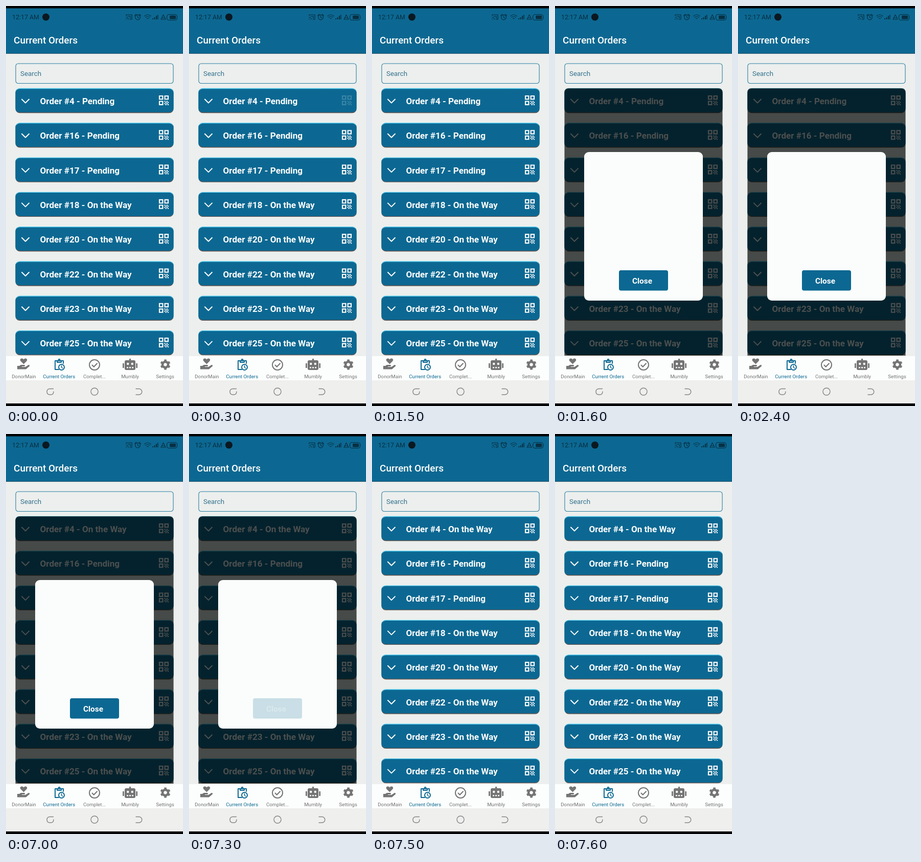
These frames come from a looping animation (346x778 px, 8000 ms). An HTML page:

```html
<!DOCTYPE html>
<html lang="en">
<head>
<meta charset="utf-8">
<title>Current Orders</title>
<style>
  html, body { margin: 0; width: 100%; height: 100%; overflow: hidden; background: #000; }
  svg { display: block; font-family: Roboto, sans-serif; }
  .line { fill: none; stroke-linecap: round; stroke-linejoin: round; }
  .order { font-size: 17.1px; font-weight: 700; fill: #fff; }
  .tab { font-size: 9.7px; text-anchor: middle; }
</style>
</head>
<body>
<svg width="346" height="778" viewBox="0 0 346 778">
  <defs>
    <linearGradient id="edge" x2="0" y2="1">
      <stop offset="0" stop-color="#55cdf2"/>
      <stop offset=".12" stop-color="#0c6892"/>
      <stop offset=".88" stop-color="#0c6892"/>
      <stop offset="1" stop-color="#66544f"/>
    </linearGradient>
    <path id="codeIcon" fill="#fff" fill-rule="evenodd" d="M3 3h8v8H3zM5 5v4h4V5zM3 13h8v8H3zM5 15v4h4v-4zM13 3h8v8h-8zM15 5v4h4V5zM13 13h2v2h-2zM15 15h2v2h-2zM13 17h2v2h-2zM17 13h2v2h-2zM19 15h2v2h-2zM17 17h2v2h-2zM15 19h2v2h-2zM19 19h2v2h-2z"/>
  </defs>

  <rect y="5" width="346" height="768" fill="#ecefed"/>
  <rect y="4.500" width="346" height="88.500" fill="#0c6892"/>
  <rect y="92" width="346" height="1" fill="#34566a"/>

  <!-- status bar -->
  <g fill="#082f42">
    <text x="12" y="26" font-size="12.4">12:17 AM</text>
    <circle cx="78" cy="21.5" r="7" fill="#0b1820"/>
    <path d="M286 26h2v-2h-2zM289.5 26h2v-4h-2zM293 26h2v-7h-2zM296 26h1.500v-9h-1.500z"/>
    <rect x="320" y="18.500" width="12" height="7" rx="1.500"/>
  </g>
  <g class="line" stroke="#082f42" stroke-width="1.200">
    <path d="M235 19v-2h11v9h-4M235 22a4 4 0 0 1 4 4M235 25v1M238 20h5v4"/>
    <circle cx="257.500" cy="22" r="4.800"/>
    <path d="M257.500 19v3l2 1.500M251.500 19l3-3M263.500 19l-3-3M271 19.500q6-5 12 0M273 22q4-3 8 0M275.500 24.500q1.500-1 3 0M303 26l4.500-9 4.500 9zM304.500 23h6"/>
    <rect x="314.500" y="16.500" width="20" height="11" rx="4"/>
  </g>

  <text x="15" y="73" font-size="19" font-weight="500" fill="#fff">Current Orders</text>
  <rect x="19" y="112" width="308" height="38.500" rx="5" fill="none" stroke="#2b7ea3" stroke-width="1.100"/>
  <text x="28" y="136" font-size="13.400" fill="#34718e">Search</text>

  <g id="cards"></g>

  <g id="modal">
    <path d="M18.500 680V168q0-8 8-8h293q8 0 8 8v512z" fill="#000503" opacity=".7"/>
    <rect x="57" y="284" width="232" height="289" rx="9" fill="#fafdfc"/>
    <g id="close">
      <rect x="125" y="514" width="96" height="39.500" rx="4" fill="#0c6892"/>
      <text x="170.500" y="539.500" font-size="15.400" font-weight="700" fill="#fff" text-anchor="middle">Close</text>
    </g>
  </g>

  <!-- tab bar -->
  <rect y="681" width="346" height="47" fill="#fcfefd"/>
  <g fill="#747474">
    <path d="M34.500 696.500l-6-6c-3-4 3-7 6-3 3-4 9-1 6 3zM22 700h4l3-2h7q2.500 1.500 0 3h-5v1h7l6-4q3 0 2 2.500l-7 6H22z"/>
    <path fill-rule="evenodd" d="M241 686h3v3h6q3 0 3 3v13q0 3-3 3h-15q-3 0-3-3v-13q0-3 3-3h6zM236 696a2.200 2.200 0 1 0 4.400 0a2.200 2.200 0 1 0-4.400 0zM244.600 696a2.200 2.200 0 1 0 4.400 0a2.200 2.200 0 1 0-4.400 0zM236 702v2.500h3V702zM241 702v2.500h3V702zM246 702v2.500h3V702zM228 695h2.800v9H228zM254.200 695h2.800v9h-2.800z"/>
    <text class="tab" x="35" y="724">DonorMain</text>
    <text class="tab" x="173" y="724">Complet...</text>
    <text class="tab" x="242.500" y="724">Mumbly</text>
    <text class="tab" x="311" y="724">Settings</text>
  </g>
  <g fill="none" stroke="#747474">
    <circle cx="173" cy="698" r="10" stroke-width="2"/>
    <path class="line" d="M168.500 698.500l3.200 3.200 6.300-6.500" stroke-width="2"/>
    <g transform="translate(311.500 697.500) rotate(15)">
      <circle r="5.500" stroke-width="4.600"/>
      <circle r="8.500" stroke-width="3" pathLength="12" stroke-dasharray="1 1"/>
    </g>
  </g>
  <g class="line" stroke="#0c6892" stroke-width="2">
    <path d="M103 707h-7v-17h16v5M100 690v3h8v-3"/>
    <circle cx="104" cy="688.500" r="1.500"/>
    <circle cx="108.500" cy="702.500" r="5.500"/>
    <path d="M108.500 699.500v3l2 2" stroke-width="1.500"/>
  </g>
  <text class="tab" x="103.700" y="724" fill="#0c6892">Current Orders</text>

  <!-- system navigation -->
  <rect y="728" width="346" height="45" fill="#eff0ee"/>
  <g class="line" stroke="#858585" stroke-width="1.400">
    <path d="M92.500 744.500H85.500a5.500 5.500 0 0 0-5.500 5.500q0 6 6 6h1.500q5.500 0 5.500-6"/>
    <circle cx="173" cy="750" r="7"/>
    <path d="M254 744.500h6a5.700 5.700 0 0 1 0 11.500h-6"/>
  </g>
</svg>
<script>
const $ = id => document.getElementById(id);
const LOOP = 8000;
const orders = [4, 16, 17, 18, 20, 22, 23, 25];
const label = (n, pending) => `Order #${n} - ${pending ? 'Pending' : 'On the Way'}`;

$('cards').innerHTML = orders.map((n, i) => `
  <g transform="translate(0 ${160 + i * 67.3})">
    <rect x="19" y=".5" width="308" height="47" rx="8" fill="#0c6892" stroke="url(#edge)" stroke-width="1.4"/>
    <path class="line" d="M31 21.500l7 7 7-7" stroke="#fff" stroke-width="2"/>
    <text class="order" x="66.500" y="31">${label(n, i < 3)}</text>
    <use href="#codeIcon" transform="translate(295.700 10.700) scale(1.06)"/>
  </g>`).join('');

const firstLabel = document.querySelector('.order');
const firstIcon = document.querySelector('use');
const closeText = document.querySelector('#close text');
const ramp = (t, from, to) => Math.min(1, Math.max(0, (t - from) / (to - from)));

function draw(now) {
  const t = now % LOOP;
  const pressed = t >= 7300;
  firstIcon.setAttribute('opacity', 1 - 0.8 * (ramp(t, 100, 250) - ramp(t, 400, 650)));
  firstLabel.textContent = label(orders[0], t < 7000);
  $('modal').style.display = t >= 1600 && t < 7500 ? '' : 'none';
  $('close').setAttribute('opacity', pressed ? 0.2 : 1);
  closeText.setAttribute('fill', pressed ? '#5f9cb8' : '#fff');
}

const start = performance.now();
function frame() {
  draw(performance.now() - start);
  requestAnimationFrame(frame);
}
frame();
</script>
</body>
</html>
```
